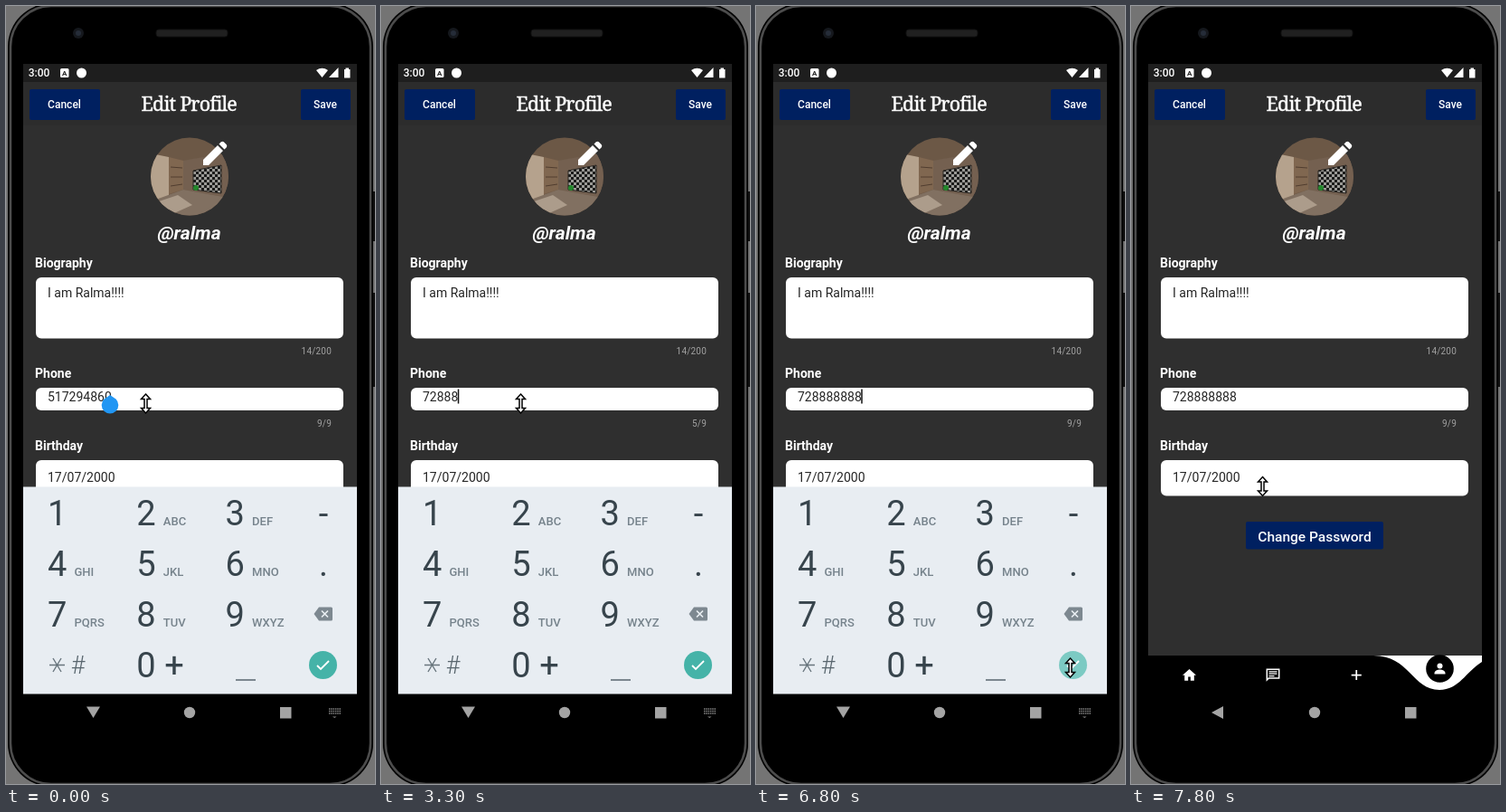
Write an HTML page that moves like this. It is 408x860 px and loops after 8000 ms.

```html
<!DOCTYPE html>
<html lang="en">
<head>
<meta charset="utf-8">
<title>Edit profile</title>
<style>
html, body { margin: 0; width: 100%; height: 100%; overflow: hidden; background: #747474; }
svg { display: block; font-family: Roboto, sans-serif; }
text { white-space: pre; }
.label { font-size: 14px; font-weight: 700; fill: #fff; }
.value { font-size: 14px; fill: #262626; }
.count { font-size: 10px; letter-spacing: .2px; fill: #a2a2a2; text-anchor: end; }
.btn { font-size: 12px; font-weight: 500; fill: #fff; text-anchor: middle; }
.title { font: 21.5px "Noto Serif", serif; letter-spacing: -.8px; fill: #fff; stroke: #fff; stroke-width: .45px; }
.digit { font-size: 38px; fill: #37444c; }
.mid { text-anchor: middle; }
.letters { font-size: 13px; font-weight: 500; fill: #76838c; }
</style>
</head>
<body>
<svg width="408" height="860" viewBox="0 0 408 860">
  <defs>
    <clipPath id="face"><circle cx="203" cy="188.500" r="43"/></clipPath>
    <clipPath id="screen"><path d="M19 64H388V795Q388 802 381 802H26Q19 802 19 795Z"/></clipPath>
    <pattern id="checks" width="6" height="6" patternUnits="userSpaceOnUse">
      <path d="M0 0h6v6H0z" fill="#1c1c1b"/><path d="M0 0h3v3H0zM3 3h3v3H3z" fill="#9a9995"/>
    </pattern>
  </defs>

  <!-- Phone body -->
  <rect x="405" y="205" width="3" height="55" fill="#111"/>
  <rect x="405" y="317" width="3" height="104" fill="#111"/>
  <rect x="2" y="-3" width="404" height="866" rx="48" fill="#000"/>
  <rect x="5" y="0" width="398" height="860" rx="45" fill="none" stroke="#4c4c4c" stroke-width="2.500"/>
  <circle cx="80" cy="30" r="6" fill="#15181d"/><circle cx="80" cy="30" r="3" fill="#252c38"/>
  <rect x="166" y="26" width="79" height="8" rx="3" fill="#202020" stroke="#111"/>

  <g clip-path="url(#screen)">
    <rect x="19" y="64" width="369" height="654" fill="#2f2f2f"/>
    <rect x="19" y="84" width="369" height="48" fill="#2c2c2c"/>
    <rect x="19" y="64" width="369" height="20" fill="#1e1e1e"/>

    <!-- Status bar -->
    <text x="24.700" y="78" font-size="12" font-weight="500" fill="#fff">3:00</text>
    <rect x="60" y="69" width="9.500" height="10" rx="1.500" fill="#fff"/>
    <text x="64.700" y="77" font-size="8" font-weight="700" class="mid" fill="#1e1e1e">A</text>
    <circle cx="83.500" cy="74" r="5.500" fill="#fff"/>
    <path d="M343 71Q349.500 66.500 356 71L349.500 79ZM367.500 68V79H357ZM374 70h1.500v-1.500h3.500V70h1.500v9.500h-6.500Z" fill="#fff"/>

    <!-- Header -->
    <rect x="26" y="92" width="78" height="34" rx="2" fill="#002060"/>
    <text x="64.500" y="112.500" class="btn">Cancel</text>
    <rect x="326" y="92" width="55" height="34" rx="2" fill="#002060"/>
    <text x="353" y="112.500" class="btn">Save</text>
    <text x="149.500" y="116" class="title">Edit Profile</text>

    <!-- Avatar -->
    <g clip-path="url(#face)">
      <rect x="160" y="145" width="86" height="87" fill="#6c5846"/>
      <path d="M160 163L180 167V211L160 216Z" fill="#b5a28d"/>
      <path d="M180 167L196 171V203L180 208Z" fill="#806750"/>
      <path d="M182 178L195 179M182 189L195 189M182 199L195 197" stroke="#503d2f"/>
      <path d="M196 171L246 162V212L196 203Z" fill="#746050"/>
      <path d="M160 216L196 203L246 212V232H160Z" fill="#817061"/>
      <path d="M166 217L190 209L206 220L186 229Z" fill="#ac9c8b"/>
      <path d="M207 182L238 176V207L207 203Z" fill="url(#checks)" stroke="#2b2723"/>
      <circle cx="210" cy="201" r="3" fill="#23862b"/>
    </g>
    <path d="M218 176v-6L234 154l6 6L224 176ZM235.500 152.500l2.300-2.300q1.500-1 3 0l3 3q1 1.500 0 3l-2.300 2.300Z" fill="#fff"/>
    <text x="202.500" y="257.500" class="mid" font-size="21" font-weight="700" font-style="italic" fill="#fff">@ralma</text>

    <!-- Form -->
    <text x="32" y="289" class="label">Biography</text>
    <rect x="33" y="300" width="340" height="67.500" rx="6" fill="#fff"/>
    <text x="46" y="322" class="value">I am Ralma!!!!</text>
    <text x="360" y="385" class="count">14/200</text>
    <text x="32" y="411" class="label">Phone</text>
    <rect x="33" y="422" width="340" height="25" rx="6" fill="#fff"/>
    <text x="46" y="436.500" class="value" id="phone"></text>
    <rect id="caret" y="423.500" width="1.500" height="16" fill="#111"/>
    <path id="handle" d="M115 430L121.500 434.500A9.300 9.300 0 1 1 108.500 434.500Z" fill="#2196f3"/>
    <text x="360" y="464.500" class="count" id="count"></text>
    <text x="32" y="490.500" class="label">Birthday</text>
    <rect x="33" y="502" width="340" height="39.500" rx="6" fill="#fff"/>
    <text x="46" y="525.500" class="value">17/07/2000</text>
    <rect x="127" y="570" width="152" height="30.500" rx="2" fill="#002060"/>
    <text x="203" y="591.500" class="btn" style="font-size:15.500px">Change Password</text>
    <rect id="cover" x="120" y="591" width="166" height="14" fill="#2f2f2f"/>

    <!-- Tab bar -->
    <rect x="19" y="718" width="369" height="84" fill="#000"/>
    <path d="M268 718C308 718 311 756 341 756S374 718 414 718Z" fill="#fff"/>
    <circle cx="341.500" cy="732.500" r="15.300" fill="#000"/>
    <g fill="#fff">
      <path d="M64.500 733l7.500 6.800h-2.200v6h-4v-4.300h-2.600v4.300h-4v-6H57Z"/>
      <path d="M150.300 745V733.300H163.700V743H152.300Z" fill="none" stroke="#fff" stroke-width="1.500"/>
      <path d="M152.500 735.800h9M152.500 738.200h9M152.500 740.600h6" stroke="#fff" stroke-width="1.200"/>
      <path d="M248.400 734h1.700v4.700h4.700v1.700h-4.700v4.700h-1.700v-4.700h-4.700v-1.700h4.700Z"/>
      <circle cx="341.500" cy="729.500" r="3"/>
      <path d="M335.500 738.500v-1.500q1-3.500 6-3.500t6 3.500v1.500Z"/>
    </g>

    <!-- Number pad -->
    <g id="pad">
      <rect x="19" y="531.500" width="369" height="229" fill="#e8edf2"/>
      <g id="keys"></g>
      <path d="M48 728.500H65M52 721L61 736M61 721L52 736" stroke="#68757d" stroke-width="1.400"/>
      <text x="79.500" y="738" class="mid" font-size="27" font-weight="300" fill="#59666e">#</text>
      <path d="M254 745H276" stroke="#59666e" stroke-width="1.500"/>
      <path d="M340.500 672L346 664.500H359.500Q361 664.500 361 666V678Q361 679.500 359.500 679.500H346Z" fill="#7d8890"/>
      <path d="M349 668.500l7 7m0-7l-7 7" stroke="#e8edf2" stroke-width="1.700"/>
      <circle id="done" cx="350.500" cy="728.500" r="15.500"/>
      <path d="M344 729l4 4 9-9" fill="none" stroke="#fff" stroke-width="1.800"/>
    </g>
  </g>

  <!-- System buttons -->
  <g id="system">
    <path id="back"/>
    <circle cx="203" cy="781" r="6.200"/>
    <path d="M303 775h12.500v12.500H303Z"/>
  </g>
  <g id="switch" fill="none" stroke="#858585">
    <path d="M357 777h13M357 779.500h13M357 782h13" stroke-width="1.500" stroke-dasharray="1.500 .8"/>
    <path d="M361 785.500h4.500l-2.200 1.500Z" fill="#858585" stroke="none"/>
  </g>

  <path id="pointer" d="M0-10.500L5-5H1.500V5H5L0 10.500-5 5H-1.500V-5H-5Z" fill="#fff" stroke="#000" stroke-width="1.500"/>
</svg>
<script>
const LOOP = 8000, OLD = "517294860", NEW = "728888888", DIGIT = 7.86;
const $ = id => document.getElementById(id);
const show = (id, on) => $(id).style.display = on ? "" : "none";

// Each step is [start in ms, ...values]; a value holds until the next step.
const LENGTH = [[0, 9], [800, 8], [1000, 6], [1300, 3], [1500, 0], [2300, 1], [2500, 2],
  [3000, 3], [3300, 5], [3500, 6], [3800, 7], [4000, 8], [4300, 9]];
const CARET = [[0, 0], [300, 1], [1800, 0], [2300, 1], [5000, 0], [5500, 1], [6000, 0], [6500, 1], [7000, 0]];
const POINTER = [[0, 154.5, 439.5], [5300, 205, 520], [5500, 285, 620], [5800, 303, 660], [6000, 319, 690],
  [6300, 337, 714], [6500, 347.5, 731.5], [7000, 339.5, 728], [7300, 240, 630], [7500, 145.5, 531]];
const at = (steps, t) => steps.findLast(s => s[0] <= t);

const LETTERS = ["", "ABC", "DEF", "GHI", "JKL", "MNO", "PQRS", "TUV", "WXYZ"];
const key = (x, y, s, cls) => `<text x="${x}" y="${y}" class="${cls}">${s}</text>`;
$("keys").innerHTML = LETTERS.map((s, i) => {
  const x = 46 + i % 3 * 98.3, y = 573.5 + Math.floor(i / 3) * 56.2;
  return key(x, y, i + 1, "digit") + key(x + 29.5, y, s, "letters");
}).join("") + key(144.3, 742, "0", "digit") + key(186, 742, "+", "digit mid")
  + key(351, 573.5, "-", "digit mid") + key(351, 629.7, ".", "digit mid");

function draw(t) {
  const n = at(LENGTH, t)[1], [, x, y] = at(POINTER, t);
  const sliding = t >= 7000 && t < 7300, open = t < 7000;
  $("phone").textContent = (t < 2300 ? OLD : NEW).slice(0, n);
  $("count").textContent = n + "/9";
  $("caret").setAttribute("x", 46 + n * DIGIT - .5);
  show("caret", at(CARET, t)[1]);
  show("handle", t < 800);
  show("cover", sliding);
  show("pad", open || sliding);
  $("pad").setAttribute("transform", `translate(0 ${sliding ? 231 : 0})`);
  $("done").setAttribute("fill", t >= 6800 ? "#7ccac3" : "#45b3a8");
  show("switch", open);
  $("system").setAttribute("fill", sliding ? "#f8fafb" : "#a4a4a4");
  $("back").setAttribute("d", open ? "M89 774.5H104L96.500 787Z" : "M102 774V788L89 781Z");
  $("pointer").setAttribute("transform", `translate(${x} ${y})`);
}

function tick() {
  draw(performance.now() % LOOP);
  requestAnimationFrame(tick);
}
tick();
</script>
</body>
</html>
```
